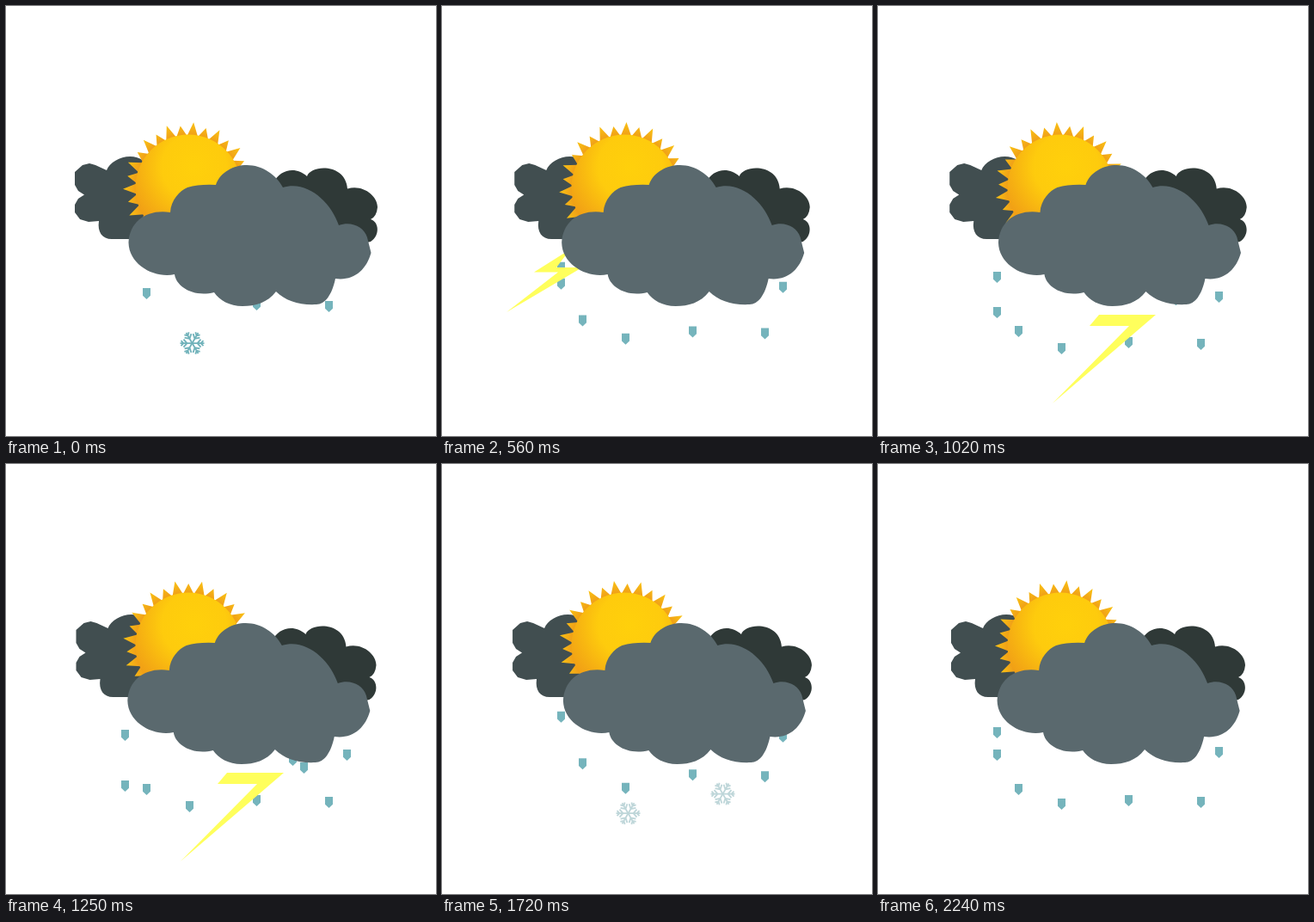
An HTML page that plays this animation: 500x500 px, repeating every 2.28 s.

```html
<!DOCTYPE html>
<html lang="en">
<head>
<meta charset="utf-8">
<title>Changing weather</title>
<style>
  html, body { margin: 0; width: 100%; height: 100%; overflow: hidden; background: #fff; }
  svg { display: block; width: 100%; height: 100%; }
</style>
</head>
<body>
<svg id="stage" viewBox="0 0 500 500">
  <defs>
    <radialGradient id="glow" gradientUnits="userSpaceOnUse" cx="219" cy="187" r="84">
      <stop offset="0" stop-color="#ffd00b"/>
      <stop offset=".45" stop-color="#fecb0d"/>
      <stop offset="1" stop-color="#f09c16"/>
    </radialGradient>
    <radialGradient id="rayGlow" gradientUnits="userSpaceOnUse" cx="212" cy="211" r="76">
      <stop offset=".8" stop-color="#f09f18"/>
      <stop offset="1" stop-color="#fac313"/>
    </radialGradient>
    <path id="drop" d="M-4.5 0H4.5V8.8L0 13L-4.5 8.8Z"/>
    <path id="arm" d="M0 0H14M6 0L10 -4.5M6 0L10 4.5M10 0L13 -3M10 0L13 3"/>
    <g id="flake" fill="none" stroke-width="1.8"></g>
  </defs>
  <path id="leftCloud" fill="#414e50" d="M117 191
    C122 178 145 169 160 180L190 200V262L150 271H123C112 271 106 263 108 250
    L96 251L86 248L80 240V231L84 224L91 219.5L84 215L80 208V193
    L89 185L97 183L104 185Z"/>
  <path id="rightCloud" fill="#2f3937" d="M311 206
    C318 190 337 186 350 198C355 184 395 183 397 212.5
    C414 207 432 220 432 234Q431 245 424 248
    C434 251 435 267 424 274L350 290L300 240Z"/>
  <g id="drops" fill="#75b4bc"></g>
  <g id="bolts" fill="#ffff5c">
    <path id="leftBolt" d="M149 283L107 309.5H135L75 356L163 304H133Z"/>
    <path id="midBolt" d="M257 359H323L203 462L292 372H246Z"/>
  </g>
  <path id="rays" fill="url(#rayGlow)"/>
  <circle cx="212" cy="211" r="61.5" fill="url(#glow)"/>
  <g id="flakes"></g>
  <path id="frontCloud" fill="#5a696e" d="M142.5 275
    C144 250 164 236 191 240C192 225 202 215 211 211Q225 207 244 208
    C249 193 265 185 280 185C298 185 314 196 322 211
    C350 202 378 228 387 255C402 250 416 257 420 269L424.5 287
    C419 307 404 320 383 317C379 336 371 347 361 347C341 348 325 343 314 332
    C304 345 290 349 275 349C260 349 248 342 242 333
    C217 339 198 326 196 312C174 317 143 302 142.5 275Z"/>
</svg>
<script>
const LOOP = 2280, CYCLE = 1450;
const $ = id => document.getElementById(id);

// Piecewise linear value through [time, value] pairs.
function track(keys, t) {
  if (t <= keys[0][0]) return keys[0][1];
  for (let i = 1; i < keys.length; i++) {
    const [t0, a] = keys[i - 1], [t1, b] = keys[i];
    if (t <= t1) return a + (b - a) * (t - t0) / (t1 - t0);
  }
  return keys[keys.length - 1][1];
}

function use(parent, id) {
  const node = document.createElementNS("http://www.w3.org/2000/svg", "use");
  node.setAttribute("href", "#" + id);
  return parent.appendChild(node);
}

const move = (node, x, y) => node.setAttribute("transform", `translate(${x} ${y})`);
const show = (node, on) => node.setAttribute("visibility", on ? "visible" : "hidden");

const EARLY = [[0, 0], [100, 5], [360, 19], [460, 26], [790, 44]];
const LATER = [[200, -6], [360, 0], [460, 3], [790, 15], [900, 18]];
const LONG = [[430, -2], [460, 0], [790, 22], [1250, 58], [1450, 72]];
const LAST = [[900, -18], [1250, 0], [1450, 10]];

const drops = [
  [163, 328, EARLY], [291, 341, EARLY], [375, 343, EARLY],
  [213, 374, LATER], [396, 314, LATER], [138, 291, LATER],
  [138, 310, LONG], [333, 338, LAST], [346, 347, LAST]
].map(([x, y, keys]) => ({ x: x + .5, y, keys, node: use($("drops"), "drop") }));

for (let i = 0; i < 6; i++)
  use($("flake"), "arm").setAttribute("transform", `rotate(${i * 60})`);

const flakes = [
  { x: 216.5, y: 392, keys: EARLY, start: 0 },
  { x: 326.5, y: 387, keys: [[150, -8], [360, 0], [460, 4]], start: 150 }
].map(f => ({ ...f, node: use($("flakes"), "flake") }));

// Thirty rays, alternately long and short.
function raysPath() {
  const point = (deg, r) => {
    const a = deg * Math.PI / 180;
    return `${(212 + r * Math.sin(a)).toFixed(2)} ${(211 - r * Math.cos(a)).toFixed(2)}`;
  };
  let d = "";
  for (let i = 0; i < 30; i++)
    d += `${i ? "L" : "M"}${point(i * 12 - 6, 60)}L${point(i * 12, i % 2 ? 72 : 76)}`;
  return d + "Z";
}
$("rays").setAttribute("d", raysPath());

function flakeColor(p) {
  const channel = (a, b) => Math.round(track([[0, a], [100, a], [360, b], [530, 255]], p));
  return `rgb(${channel(112, 230)},${channel(178, 233)},${channel(186, 233)})`;
}

function render(t) {
  const p = t % CYCLE;
  const sway = 1 - Math.abs(1 - 2 * p / CYCLE);
  move($("leftCloud"), 5.5 * sway, 0);
  move($("rightCloud"), -5.5 * sway, 0);
  move($("frontCloud"), -4.3 * sway, 0);
  $("rays").setAttribute("transform", `rotate(${4.6 + 27.5 * sway} 212 211)`);

  for (const { x, y, keys, node } of drops) {
    move(node, x, y + track(keys, p));
    show(node, p >= keys[0][0]);
  }
  for (const { x, y, keys, start, node } of flakes) {
    move(node, x, y + track(keys, p));
    node.setAttribute("stroke", flakeColor(p));
    // The first flake is late on the second pass.
    const from = t < CYCLE ? start : 150;
    show(node, p >= from && p < 530);
  }
  show($("leftBolt"), p >= 300 && p < 660);
  show($("midBolt"), p >= 1000 && p < 1360);
}

const began = performance.now();
function tick() {
  render((performance.now() - began) % LOOP);
  requestAnimationFrame(tick);
}
tick();
</script>
</body>
</html>
```
